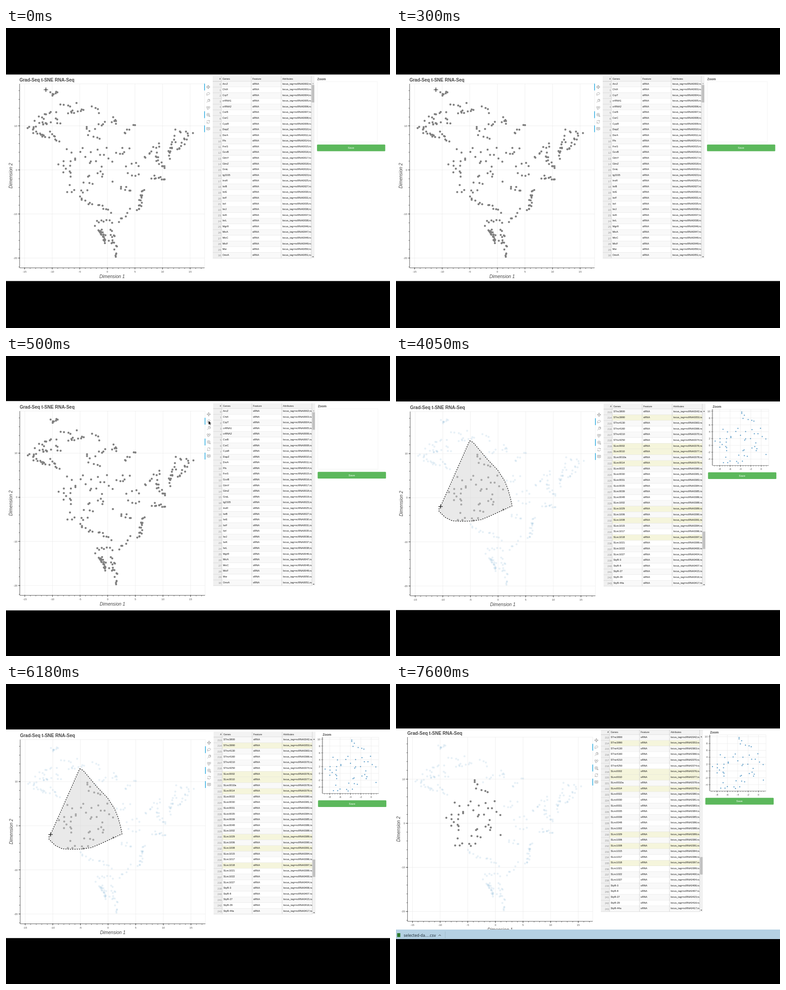
Recreate the animation shown at these times as an HTML page. Size 847x661 px, loop 8000 ms.

```html
<!DOCTYPE html>
<html lang="en">
<head>
<meta charset="utf-8">
<title>Grad-Seq t-SNE RNA-Seq</title>
<style>
html, body { margin: 0; width: 100%; height: 100%; overflow: hidden; background: #000; }
svg { display: block; width: 847px; height: 661px; font-family: "Liberation Sans", Arial, sans-serif; }
.page, .view, .rest, .at0, .at1, .at2, .at3, .at01, .at23 { animation: 8s step-end infinite; }
.page { animation-name: page; }
.view { animation-name: view; }
.rest { animation-name: dim; }
.at0 { animation-name: at0; }
.at1 { animation-name: at1; }
.at2 { animation-name: at2; }
.at3 { animation-name: at3; }
.at01 { animation-name: at01; }
.at23 { animation-name: at23; }
@keyframes page {
  0% { y: 102.5px; height: 455px; }
  6.25% { y: 99.3px; height: 461.2px; }
  50.625% { y: 100.2px; height: 459.6px; }
  95% { y: 98px; height: 464px; }
}
@keyframes view {
  0% { transform: none; }
  6.25% { transform: translate(.4px, -1.7px) scale(1.0015, 1.001); }
  50.625% { transform: translate(1.2px, -.7px) scale(1.0015, 1.001); }
  95% { transform: translate(-4.7px, -6.1px) scale(1.0015, 1.001); }
}
@keyframes dim {
  0% { fill: #7f7f7f; fill-opacity: 1; }
  50.625% { fill: #1f77b4; fill-opacity: .1; }
}
@keyframes at0 { 0% { visibility: visible; } 6.25% { visibility: hidden; } }
@keyframes at1 { 0% { visibility: hidden; } 6.25% { visibility: visible; } 50.625% { visibility: hidden; } }
@keyframes at2 { 0% { visibility: hidden; } 50.625% { visibility: visible; } 95% { visibility: hidden; } }
@keyframes at3 { 0% { visibility: hidden; } 95% { visibility: visible; } }
@keyframes at01 { 0% { visibility: visible; } 50.625% { visibility: hidden; } }
@keyframes at23 { 0% { visibility: hidden; } 50.625% { visibility: visible; } }
</style>
</head>
<body>
<svg id="stage" viewBox="0 0 847 661"></svg>
<script>
const line = (x1, y1, x2, y2, color, width = .7) =>
  `<path d="M${x1} ${y1}L${x2} ${y2}" stroke="${color}" stroke-width="${width}"/>`;
const rect = (x, y, w, h, fill, more = '') =>
  `<rect x="${x}" y="${y}" width="${w}" height="${h}" fill="${fill}" ${more}/>`;
const dot = ([x, y], r) => `<circle cx="${x}" cy="${y}" r="${r}"/>`;
const group = (attrs, ...parts) => `<g ${attrs}>${parts.flat().join('')}</g>`;
// y is the middle of the letters
const text = (x, y, str, size, more = '') =>
  `<text x="${x}" y="${y + size * .36}" font-size="${size}" ${more}>${str}</text>`;
const MID = 'text-anchor="middle"', END = 'text-anchor="end"', BOLD = 'font-weight="bold"';
const range = (from, to, step) =>
  Array.from({ length: Math.floor((to - from) / step + 1.001) }, (_, i) => from + i * step);

// Points inside the lasso, x and y in turn
const pairs = [
  178, 218, 178, 222, 184, 227, 181, 236, 193, 239.5, 201.5, 241.5, 206.5, 244,
  134, 267, 144.5, 274.5, 169, 264.5, 164, 273, 175, 284, 187, 273.5, 202, 268,
  222, 264, 207.5, 279.5, 216, 279.5, 226, 287.5, 234.5, 294.5, 152.5, 287.5,
  152.5, 290.5, 127, 293.5, 142.5, 293.5, 115.5, 300.5, 127, 303.5, 141.5, 303.5,
  132, 310, 126.5, 318, 140.5, 316, 142.5, 319, 142.5, 327.5, 187, 294, 185, 297.5,
  198.5, 293.5, 211, 305.5, 208.5, 316, 202, 320, 213.5, 322, 212, 327.5, 183.5, 325.5,
  181, 327.5, 235, 338.5, 171, 340.5, 184, 341.5, 191, 343.5, 140.5, 346, 135, 361.5,
  145, 361.5, 150.5, 357, 166, 358, 169.5, 362.5, 179.5, 357.5];
const picked = pairs.filter((_, i) => i % 2 == 0).map((x, i) => [x, pairs[2 * i + 1]]);

// Remaining points: strokes of x1, y1, x2, y2, count
const strokes = [
  [101, 146, 112, 146, 8], [113, 171, 154, 167, 5], [63, 200, 110, 184, 9], [102, 198, 122, 211, 4],
  [135, 187, 172, 182, 9], [186, 173, 211, 186, 4], [197, 219, 222, 207, 5], [234, 198, 240, 213, 6],
  [259, 231, 283, 214, 6], [48, 219, 70, 216, 7], [62, 230, 93, 243, 10], [74, 210, 98, 209, 7],
  [95, 229, 117, 256, 7], [243, 276, 275, 267, 6], [258, 301, 298, 302, 4], [300, 289, 341, 254, 9],
  [328, 278, 348, 311, 12], [319, 329, 353, 335, 10], [264, 325, 292, 324, 4], [251, 348, 277, 360, 6],
  [303, 354, 290, 403, 17], [245, 428, 276, 400, 6], [357, 288, 372, 242, 14], [369, 225, 418, 232, 6],
  [378, 270, 403, 239, 10], [156, 373, 234, 405, 14], [190, 430, 234, 422, 8], [206, 443, 224, 472, 22],
  [234, 444, 243, 506, 17]];
let seed = 11;
const random = () => (seed = seed * 16807 % 2147483647) / 2147483647;
const jitter = () => (random() + random() - 1) * 7;
const rest = strokes.flatMap(([x1, y1, x2, y2, n]) => Array.from({ length: n }, (_, i) => {
  const t = (i + .5) / n;
  return [x1 + (x2 - x1) * t + jitter(), y1 + (y2 - y1) * t + jitter()];
}));

const DARK = '#444', GRID = '#e8e8e8';

// A chart frame: o = origin, k = pixels per unit, box = left, top, right, bottom
function axes({ o, k, box: [l, t, r, b], xs, ys, minorX, minorY, size, tick, labelX, labelY, weight }) {
  const px = v => o[0] + v * k[0], py = v => o[1] - v * k[1];
  return [
    xs.map(v => line(px(v), t, px(v), b, GRID)),
    ys.map(v => line(l, py(v), r, py(v), GRID)),
    `<path d="M${l} ${t}H${r}V${b}" fill="none" stroke="${GRID}" stroke-width=".7"/>`,
    minorX.map(v => line(px(v), b, px(v), b + tick * .6, DARK, weight)),
    minorY.map(v => line(l, py(v), l - tick * .6, py(v), DARK, weight)),
    xs.map(v => line(px(v), b - 1, px(v), b + tick, DARK, weight) + text(px(v), labelX, v, size, MID)),
    ys.map(v => line(l + 1, py(v), l - tick, py(v), DARK, weight) + text(labelY, py(v), v, size, END)),
    `<path d="M${l} ${t}V${b}H${r}" fill="none" stroke="${DARK}" stroke-width="${weight}"/>`
  ].flat();
}

function mainChart() {
  const frame = axes({
    o: [223.6, 312.7], k: [12.17, 9.71], box: [30, 123, 438, 528.5],
    xs: range(-15, 15, 5), ys: range(-20, 10, 10),
    minorX: range(-15, 17, 1), minorY: range(-22, 18, 2),
    size: 5.6, tick: 3.5, labelX: 537, labelY: 24.5, weight: .9
  });
  return group(`fill="${DARK}"`,
    text(29.7, 114, 'Grad-Seq t-SNE RNA-Seq', 10, BOLD), frame,
    text(234, 547.2, 'Dimension 1', 10.1, MID + ' font-style="italic"'),
    group('transform="translate(10.3 325.5) rotate(-90)"', text(0, 0, 'Dimension 2', 10.1, MID + ' font-style="italic"')),
    group('class="rest"', rest.map(p => dot(p, 2.25))),
    group('fill="#7f7f7f"', picked.map(p => dot(p, 2.25))));
}

function toolbar() {
  const icons = [
    'M-4 0H4M0-4V4M-4 0l1.4-1.3v2.6zM4 0L2.6-1.3v2.6zM0-4l-1.3 1.4h2.6zM0 4l-1.3-1.4h2.6z',
    'M-3 1.2C-5-2 1-4.5 3-2.2C5 1-1 2.5-3 1.2C-4 2-3.5 3.5-1.8 3.4',
    'M-1-3.5H3.5V1M3.3-1a2.2 2.2 0 1 1-4.4 0a2.2 2.2 0 1 1 4.4 0M-.6.7L-3.5 3.6',
    'M-.3-1.5a1.7 1.7 0 1 1-3.4 0a1.7 1.7 0 1 1 3.4 0M3.8-1.5a1.7 1.7 0 1 1-3.4 0a1.7 1.7 0 1 1 3.4 0M-2 .4V3.2H0M2 .4L.4 3.4',
    'M3-.5a3.2 3.2 0 1 1-6.4 0a3.2 3.2 0 1 1 6.4 0M-2-.5H1.6M-.2-2.3V1.3M1.5 3H4.5M3 1.5V4.5',
    'M-3.2-.6A3.3 3.3 0 0 1 3-1.5V-3.4M3-1.5H1M3.2.6A3.3 3.3 0 0 1-3 1.5V3.4M-3 1.5H-1',
    'M-3.5-3H3.5V2H1L0 3.5L-1 2H-3.5ZM-2.2-1.3H2.2M-2.2.3H2.2'];
  const bar = (y, cls = '') => rect(437.2, y, 1.5, 15, '#26aae1', cls);
  return group('', bar(122.5, 'class="at0"'),
    group('class="at1"', bar(137.8)), group('class="at23"', bar(137.8)),
    bar(183.5), bar(214.5),
    group('fill="none" stroke="#a2a2a2" stroke-width=".9"',
      icons.map((d, i) => `<path d="${d}" transform="translate(446 ${130 + i * 15.35})"/>`)));
}

const TOP = 117.6, PITCH = 12.57, BOTTOM = TOP + 31 * PITCH;

function rows(cls, first, entries, marked, thumb, upColor) {
  const body = entries.split(' ').map((entry, i) => {
    const [gene, tag] = entry.split(':'), y = TOP + i * PITCH, mid = y + 5;
    const fill = marked.includes(first + i) ? '#f5f5dc' : i % 2 ? '#fff' : '#f9f9f9';
    return rect(475, y, 198, PITCH, fill) + line(456, y + PITCH, 673, y + PITCH, '#ccc', .6) +
      text(474, mid + 1.5, first + i, 5.6, END + ' fill="#888"') +
      text(477.5, mid, gene, 5.6) + text(543.5, mid, 'sRNA', 5.6) +
      text(609.7, mid, `locus_tag=ncRNA${tag.padStart(4, 0)};name=`, 5.6, 'clip-path="url(#cells)"');
  });
  return group(`class="${cls}" fill="#111"`, body,
    rect(674.2, thumb, 5.8, 38.5, '#c1c1c1'),
    `<path d="M675.4 123.3h3.6l-1.8-2.2z" fill="${upColor}"/>`);
}

function table() {
  return group('',
    rect(456, 106, 217.5, 11.6, '#f3f3f3'), rect(456, 106, 19, BOTTOM - 106, '#f0f0f0'),
    rect(673.5, 106, 7, BOTTOM - 106, '#f1f1f1'),
    line(456, TOP, 673, TOP, '#bbb'),
    group('fill="#222"', text(473.5, 112, '#', 5.6, END), text(477.5, 112, 'Genes', 5.6),
      text(543.5, 112, 'Feature', 5.6), text(609.5, 112, 'Attributes', 5.6)),
    rows('at01', 0, 'ArcZ:2 ChiX:3 CrpT:4 crRNA1:5 crRNA2:6 CsrB:7 CsrC:8 CyaR:9 DapZ:10 DsrA:11 Ffs:14 FnrS:15 ' +
      'GcvB:16 GlmY:17 GlmZ:18 GraL:19 Ig2335:23 InvR:25 IsrB:27 IsrE:30 IsrF:31 IsrI:35 IsrJ:36 IsrK:37 ' +
      'IsrL:38 MgrR:46 MicA:47 MicC:48 MicF:49 Msr:50 OmrA:51', [], 125.5, '#a3a3a3'),
    rows('at23', 213, 'STnc3800:342 STnc3990:353 STnc4130:363 STnc4160:366 STnc4210:370 STnc4250:374 ' +
      'SLnc0002:376 SLnc0010:377 SLnc0010a:378 SLnc0014:379 SLnc0022:380 SLnc0030:381 SLnc0031:383 ' +
      'SLnc0035:384 SLnc0039:385 SLnc0048:386 SLnc1002:388 SLnc1029:389 SLnc1006:390 SLnc1008:391 ' +
      'SLnc1015:394 SLnc1017:396 SLnc1018:397 SLnc1021:399 SLnc1022:400 SLnc1027:404 StyR-3:406 ' +
      'StyR-8:407 StyR-27:415 StyR-29:416 StyR-44a:417', [214, 219, 220, 222, 230, 232, 235], 387, '#505050'),
    [475, 541, 607, 673.3].map(x => line(x, 106, x, BOTTOM, '#c4c4c4', .7)),
    '<path d="M675.4 503.2h3.6l-1.8 2.2z" fill="#505050"/>');
}

function zoom() {
  const o = [803.1, 197.5], k = [11.42, 7.54];
  const frame = axes({
    o, k, box: [696, 118, 819.6, 241.8], xs: range(-8, 0, 2), ys: range(-4, 10, 2),
    minorX: range(-9, 1, .5), minorY: range(-5.6, 10.4, .4),
    size: 5.6, tick: 3, labelX: 249.7, labelY: 691, weight: .7
  });
  const spots = picked.map(([x, y]) =>
    dot([o[0] + (x - 223.6) / 12.17 * k[0], o[1] + (y - 312.7) / 9.71 * k[1]], 1.25));
  return group(`fill="${DARK}"`,
    group('class="at01"', text(686.5, 112, 'Zoom', 7, BOLD),
      rect(686.5, 118, 132.5, 133, '#fff', 'stroke="#eee" stroke-width=".7"')),
    group('class="at23"', text(696.3, 112, 'Zoom', 7, BOLD), frame,
      group('fill="#1f77b4" fill-opacity=".7"', spots)),
    rect(686, 256.7, 150.5, 14.8, '#5cb85c', 'rx="1.5"'),
    text(761, 264, 'Save', 6.2, MID + ' fill="#fff"'));
}

const cross = (x, y) => ['#fff', '#000'].map((color, i) =>
  `<path d="M${x - 4.7} ${y}h9.4M${x} ${y - 4.7}v9.4" stroke="${color}" stroke-width="${2.2 - i}"/>`).join('');

const lasso = '<path d="M161 187.3L165 188.5 171 193.5 199 227 223 252 238 275.5 245.5 294 251 314 254.6 330.5' +
  ' 235 339.5 209 351.5 186 361 164 364 143 364.6 123 363.6 108 356.5 93.5 342.5 93.5 337 97 332Z"' +
  ' fill="#d3d3d3" fill-opacity=".5" stroke="#111" stroke-width="1.3" stroke-dasharray="2.5 2.5"/>';

const downloadBar = group('class="at3"',
  rect(0, 541, 847, 21, '#b5d1e3'), rect(2.5, 549, 7, 8.5, '#2c7a2c'),
  text(17, 553.8, 'selected-da....csv', 8.1, 'fill="#1c2a33" font-family="DejaVu Sans, sans-serif"'),
  '<path d="M94 555l2.5-2.6 2.5 2.6" fill="none" stroke="#333" stroke-width="1"/>',
  line(108.5, 545, 108.5, 560, '#9bb5c6', .8));

document.getElementById('stage').innerHTML =
  '<clipPath id="cells"><rect x="607" y="100" width="66" height="420"/></clipPath>' +
  rect(0, 102.5, 847, 455, '#fff', 'class="page"') +
  group('class="view"', mainChart(), toolbar(), table(), zoom(),
    group('class="at0"', cross(88, 136)),
    group('class="at1"', '<path d="M445.6 144.2v8.6l2-1.8 1.3 3 1.5-.6-1.3-3h2.8z" fill="#000" stroke="#fff" stroke-width=".4"/>'),
    group('class="at2"', lasso, cross(97, 332))) +
  downloadBar;
</script>
</body>
</html>
```
